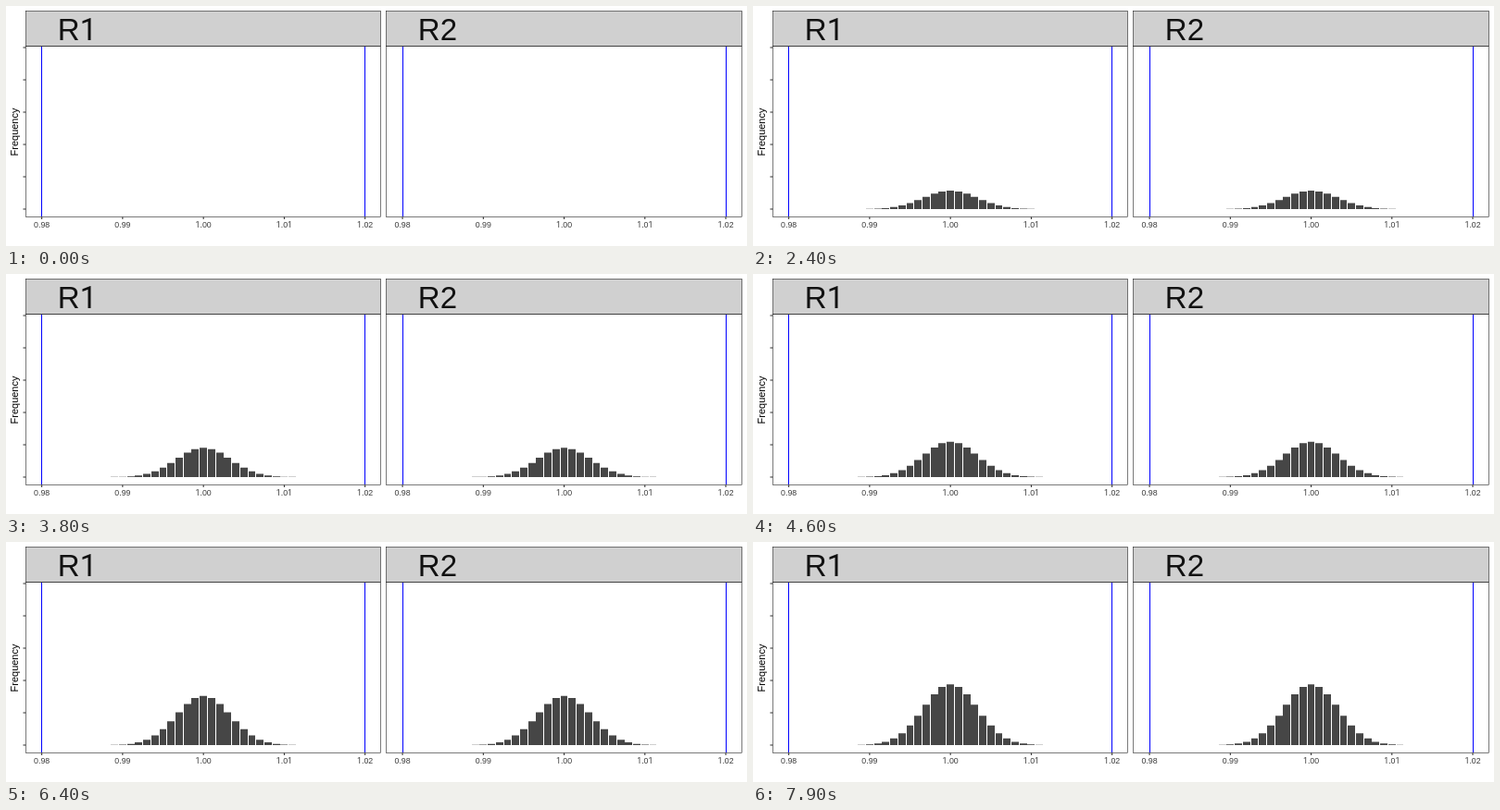
An HTML page for the animation above (8 s loop, 800 by 260 pixels).

```html
<!DOCTYPE html>
<html lang="en">
<head>
<meta charset="utf-8">
<title>Growing histograms</title>
<style>
  html, body { margin: 0; width: 100%; height: 100%; overflow: hidden; background: #fff; }
  svg { display: block; width: 800px; height: 260px; font-family: "Liberation Sans", Arial, sans-serif; }
  .one { font-family: Roboto, "Liberation Sans", sans-serif; }
  .strip { fill: #d0d0d0; }
  .frame { fill: none; }
  .strip, .frame { stroke: #222; stroke-width: .6; }
  .tick { stroke: #222; stroke-width: 1; }
  .limit { stroke: #00f; stroke-width: 1; }
  .bars { fill: #464646; }
  .label { font-size: 8.8px; fill: #3b3b3b; text-anchor: middle; }
  .title { font-size: 33px; fill: #111; }
  .axis { font-size: 11px; fill: #000; text-anchor: middle; }
</style>
</head>
<body>
<svg id="stage" viewBox="0 0 800 260"></svg>
<script>
  const stage = document.getElementById("stage");
  const BASE = 220, UNIT = 8.725, SPREAD = 3.32, REACH = 13;
  const STEP_MS = 100, STEPS = 80, GROWTH = 0.8335;
  const panels = [
    { name: "R1", left: 21.5, right: 404.5, mid: 213.15, limits: [38.5, 387.5] },
    { name: "R2", left: 410.5, right: 794.5, mid: 602.55, limits: [428.5, 777.5] }
  ];

  function add(tag, attrs, html = "") {
    const el = document.createElementNS("http://www.w3.org/2000/svg", tag);
    for (const key in attrs) el.setAttribute(key, attrs[key]);
    el.innerHTML = html;
    return stage.appendChild(el);
  }

  const line = (cls, x1, y1, x2, y2) => add("line", { class: cls, x1, y1, x2, y2 });
  const box = (cls, p, y, height) =>
    add("rect", { class: cls, x: p.left, y, width: p.right - p.left, height });

  // The digit 1 is set without a foot.
  const text = (cls, x, y, str) =>
    add("text", { class: cls, x, y }, str.replace(/1/g, '<tspan class="one">1</tspan>'));

  for (const p of panels) {
    p.bars = add("path", { class: "bars" });
    for (const x of p.limits) line("limit", x, 44, x, 228);
    box("strip", p, 5.5, 38);
    box("frame", p, 43.5, 185);
    text("title", p.left + 34.3, 37, p.name);
    for (let i = -2; i <= 2; i++) {
      const x = p.mid + i * 10 * UNIT;
      line("tick", x, 228.5, x, 231);
      text("label", x, 240, (1 + i / 100).toFixed(2));
    }
  }

  for (let y = 45; y <= BASE; y += 35) line("tick", 18.5, y, 21.3, y);
  add("text", { class: "axis", transform: "translate(13 136.5) rotate(-90)" }, "Frequency");

  function barPath(mid, peak) {
    let d = "";
    for (let i = -REACH; i <= REACH; i++) {
      const x = mid + i * UNIT;
      const left = Math.round(x - 0.45 * UNIT);
      const right = Math.round(x + 0.45 * UNIT);
      const top = BASE - peak * Math.exp(-i * i / (2 * SPREAD * SPREAD));
      d += `M${left} ${BASE}V${top.toFixed(3)}H${right}V${BASE}Z`;
    }
    return d;
  }

  const start = performance.now();
  function draw() {
    const step = Math.floor((performance.now() - start) / STEP_MS) % STEPS;
    for (const p of panels)
      p.bars.setAttribute("d", step ? barPath(p.mid, step * GROWTH) : "");
    requestAnimationFrame(draw);
  }
  draw();
</script>
</body>
</html>
```
